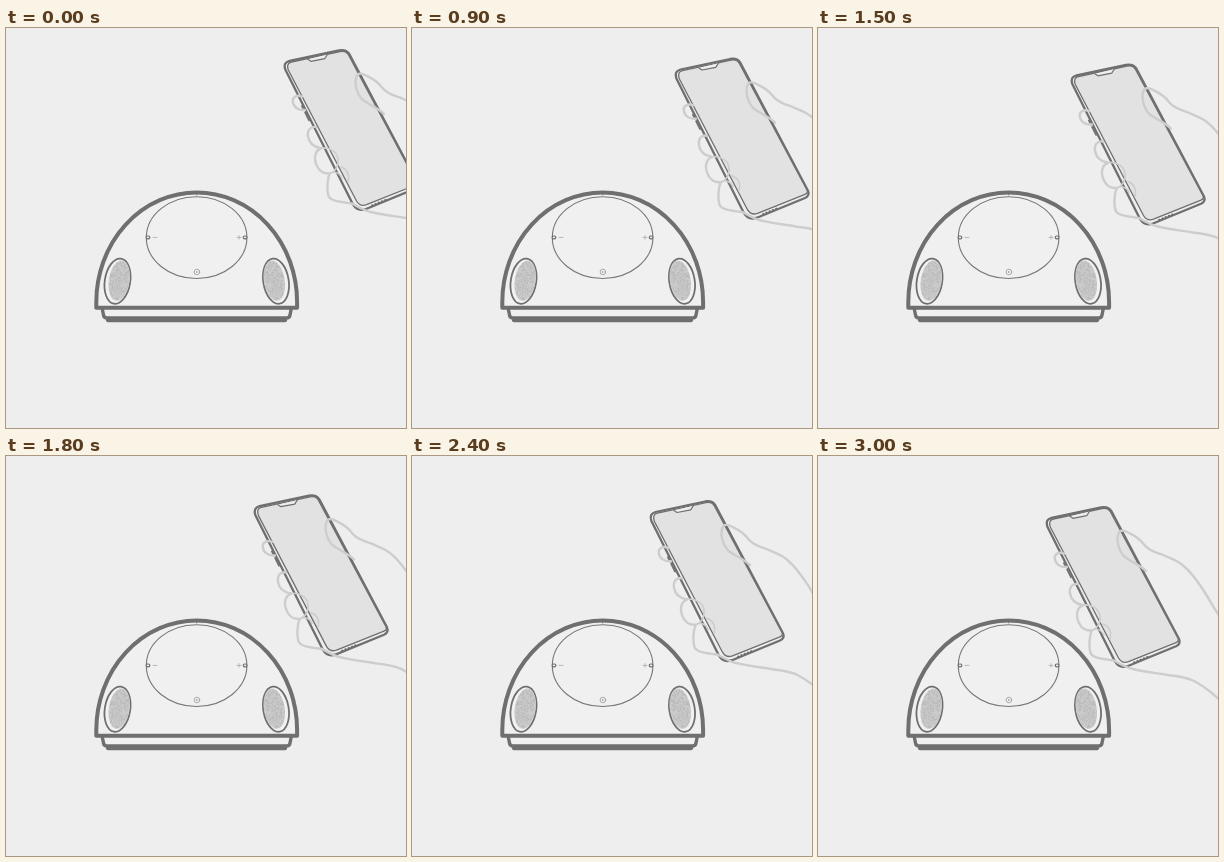
Recreate the animation shown at these times as an HTML page. Size 400 by 400 pixels, loop 4 s.

```html
<!DOCTYPE html>
<html lang="en">
<head>
<meta charset="utf-8">
<title>Phone approaching a speaker</title>
<style>
html, body { margin: 0; width: 100%; height: 100%; overflow: hidden; background: #eee; }
svg { display: block; width: 100vw; height: 100vh; }
</style>
</head>
<body>
<svg viewBox="0 0 400 400" fill="none" stroke="#6f6f70" stroke-linecap="round" stroke-linejoin="round">
  <defs>
    <g id="grille">
      <ellipse cx="111.5" cy="253.2" rx="12.7" ry="22.8" transform="rotate(9 111.5 253.2)" fill="#f1f1f1" stroke-width="1.8"/>
      <g transform="translate(113.2 252.6) rotate(9)">
        <ellipse rx="10.4" ry="20.4" fill="#cbcbcb" stroke="none"/>
        <path id="specks" stroke="#b4b4b4" stroke-width=".7"/>
      </g>
    </g>
  </defs>

  <g id="speaker">
    <path d="M96.300 281L97.600 287.500Q98.200 290 101 290H280.500Q283.300 290 283.900 287.500L285.200 281" fill="#f0f0f0" stroke-width="3.400"/>
    <path d="M102 292.200H279" stroke-width="4"/>
    <path d="M90.300 279.700V274A100.400 109.500 0 0 1 291.100 274V279.700Z" fill="#f0f0f0" stroke-width="4"/>
    <use href="#grille"/>
    <use href="#grille" transform="matrix(-1 0 0 1 381.500 0)"/>
    <ellipse cx="190.600" cy="209.600" rx="50.300" ry="40.900" stroke="#777" stroke-width="1.100"/>
    <path d="M190.700 165V167" stroke-width="1"/>
    <rect x="140.200" y="208" width="3.600" height="2.800" rx="1.300" fill="#eee" stroke-width="1.200"/>
    <rect x="237.300" y="208" width="3.600" height="2.800" rx="1.300" fill="#eee" stroke-width="1.200"/>
    <path d="M147 209.400H151M231 209.400H235M233 207.600V211.200" stroke="#aaa" stroke-width=".8"/>
    <circle cx="190.900" cy="244" r="2.800" stroke="#999" stroke-width=".8"/>
    <path d="M190.200 242.900V245.100L192 244Z" fill="#888" stroke="none"/>
  </g>

  <g id="phone">
    <path d="M229.300 70.500Q227 63.500 233.500 61.800L283 51.300Q290 50 293.300 55L361 183Q363 188 358 190.300L310 210Q301.500 213 297 205.500Z" fill="#eee" stroke-width="2.300"/>
    <path d="M232.300 71Q230 64.300 235.500 63L284 52.500Q290 51.300 292.500 56L359.800 182Q361.500 185.300 358 186.700L310.500 205.700Q304 208 300.500 202Z" fill="#e2e2e2" stroke-width="1.300"/>
    <path d="M251.900 60.300L255 62.300L268.700 59.700L271.400 55.500" fill="#eee" stroke-width="1.200"/>
    <path d="M245.800 107L247.800 111M249 113.500L253 121.500" stroke-width="1.600"/>
    <path d="M316 206.300L331 200.200" stroke-width="1.800" stroke-dasharray=".5 3"/>
    <g id="hand" stroke="#cdcdcd" stroke-width="2.400">
      <path d="M412 178L400 158C396 152 391 143 385 133.500C379 124.500 372 115 365 109.500C358 103.500 351 102 345 99C338 96.500 331 95 326 88.500C321 81.500 315 79 310 76.500C305 73.500 301 74 300 79C298.500 86 301 94 305 99C310 105 320 107 328 115"/>
      <path d="M246 97.500C241 95.500 236.500 98 236.700 102C237 108 242 111.500 249 111"/>
      <path d="M260 128C254 127 251 131.500 252 137.500C253 143.500 257 147.500 264 149"/>
      <path d="M265 149.500C259 151.500 257.500 158.500 260.500 166C263 172 268 175 273 174.500"/>
      <path d="M273.500 175C271.500 180 270.500 190 272.500 197C274.500 202 284 203 296 204.500C302 208 309 212 315 213C327 216 339 217 350 219C359 220 367 221 375 224.500C382 228 389 233 395 238L412 253"/>
      <path d="M264 149C273 148 281 152 282 160C283 167 279 173 273 175M285 168C291 170 294 176 292 183M274 174C279 172 284 174 286 179" stroke-width="1.600"/>
    </g>
  </g>
</svg>
<script>
const LOOP = 4000, STEP = 300, STEPS = 10;
const phone = document.getElementById('phone');

function seeded(seed) {
  return () => (seed = (seed * 16807) % 2147483647) / 2147483647;
}

function drawSpecks() {
  const rnd = seeded(71);
  let d = '';
  for (let i = 0; i < 330; i++) {
    const a = rnd() * Math.PI * 2, r = Math.sqrt(rnd());
    const x = 10 * r * Math.cos(a), y = 20 * r * Math.sin(a);
    d += `M${x.toFixed(1)} ${y.toFixed(1)}h.1`;
  }
  document.getElementById('specks').setAttribute('d', d);
}

// The hand advances in equal hard steps, then rests.
function render(time) {
  const left = STEPS - Math.min(STEPS, Math.floor((time % LOOP) / STEP));
  phone.setAttribute('transform', `translate(${5 * left} ${-2.9 * left})`);
}

const start = performance.now();
function tick() {
  render(performance.now() - start);
  requestAnimationFrame(tick);
}

drawSpecks();
tick();
</script>
</body>
</html>
```
